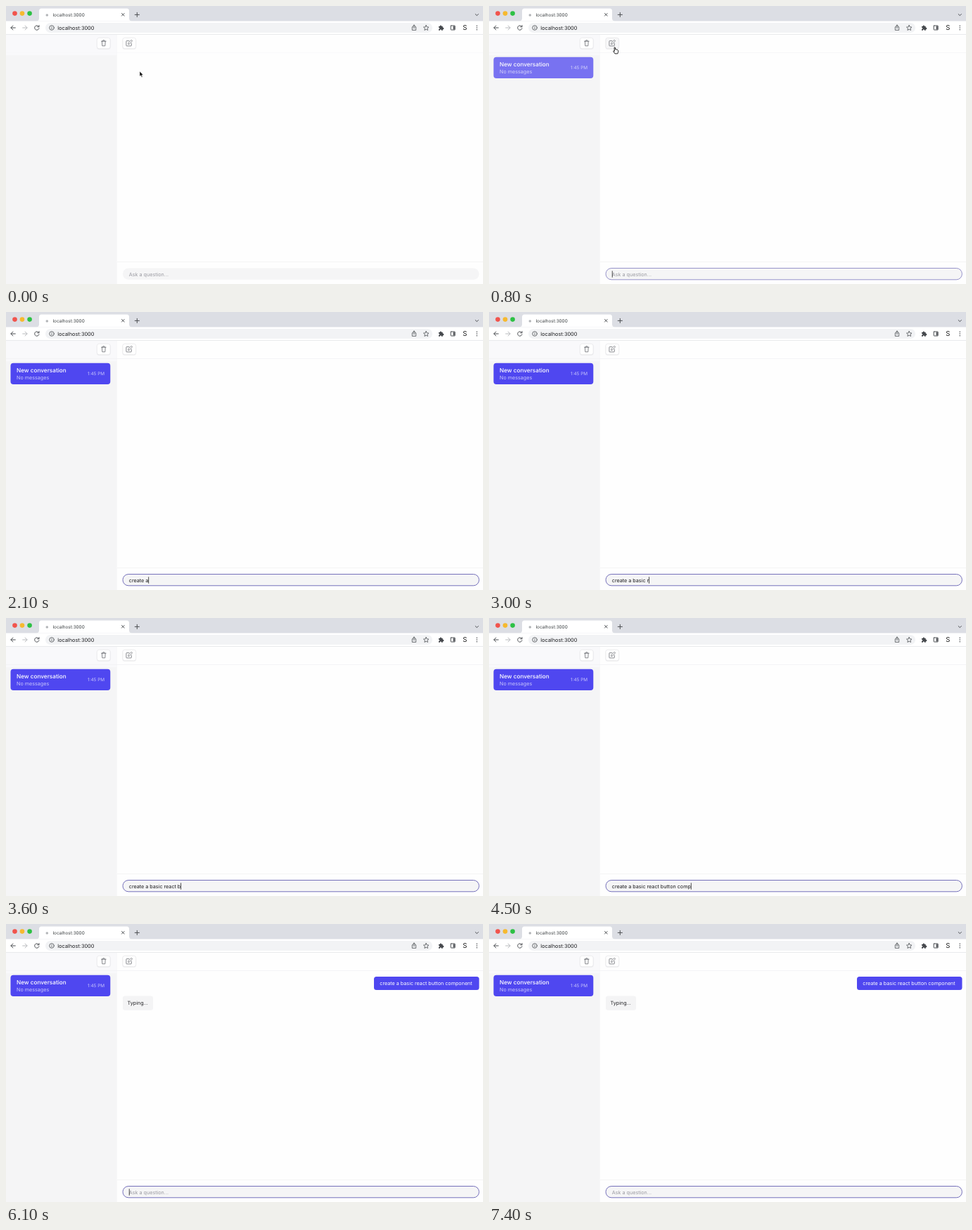
These frames come from a looping animation (678x396 px, 8000 ms). An HTML page:

```html
<!DOCTYPE html>
<html lang="en">
<head>
<meta charset="utf-8">
<title>Chat</title>
<style>
  html, body { margin: 0; width: 100%; height: 100%; overflow: hidden; background: #fefefe; }
  svg { display: block; width: 678px; height: 396px; }
  text { font: 7.2px Inter, "Liberation Sans", sans-serif; white-space: pre; text-rendering: geometricPrecision; }
  .icon { fill: none; stroke: #4b4e52; stroke-width: 1; stroke-linecap: round; stroke-linejoin: round; }
  .thin { stroke-width: .8; }
  .button { fill: #fff; stroke: #e5e5e8; stroke-width: .7; }
</style>
</head>
<body>
<svg viewBox="0 0 678 396">
  <!-- browser window -->
  <rect width="678" height="22" fill="#dcdee4"/>
  <circle cx="12.5" cy="10.6" r="3.3" fill="#f1544d"/>
  <circle cx="23" cy="10.6" r="3.3" fill="#f6b92f"/>
  <circle cx="33.6" cy="10.6" r="3.3" fill="#2dc144"/>
  <path d="M43 21.5q4 0 4-4V7q0-3.5 3.5-3.5H171.5q3.5 0 3.5 3.5V17.5q0 4 4 4z" fill="#fff"/>
  <circle cx="58.3" cy="13" r="1.8" fill="#b3b5b8"/>
  <text x="66.5" y="14.6" fill="#3c4043" style="font-size:6.4px">localhost:3000</text>
  <path class="icon" d="M164.5 10.5l3.6 3.6m0-3.6l-3.6 3.6M183.2 12.4h6.2m-3.1-3.1v6.2M667.2 11.6l2.1 2 2.1-2"/>
  <rect y="21.5" width="678" height="19" fill="#fff"/>
  <rect x="56" y="24" width="550" height="14" rx="7" fill="#f2f3f5"/>
  <text x="73.2" y="33.5" fill="#202124" style="font-size:7.4px">localhost:3000</text>
  <path d="M0 40.5H678" stroke="#e4e5e8" stroke-width=".8"/>
  <g class="icon">
    <path d="M13.3 31H7m2.9-3L6.9 31l3 3"/>
    <path d="M23.7 31H30m-2.9-3l3 3-3 3" stroke="#b9bbbe"/>
    <path d="M46.6 29.3a3.2 3.2 0 1 0 .4 2.6M47 27.6v2.2h-2.2"/>
    <g class="thin">
      <circle cx="65" cy="31" r="3.3"/>
      <path d="M65 30.8v1.7M65 29.3v.1"/>
      <path d="M578.800 29.800h-1.500v4.600h5.400v-4.600h-1.500M580 32v-5m-1.600 1.500L580 27l1.600 1.500"/>
      <path d="M597.200 27.400l1.100 2.400 2.600.3-1.900 1.800.5 2.600-2.300-1.300-2.300 1.300.5-2.600-1.900-1.800 2.600-.3z"/>
    </g>
    <rect x="632.2" y="28" width="6" height="6" rx=".5"/>
    <path d="M636.7 28.5v5" stroke-width="2" stroke-linecap="butt"/>
  </g>
  <path d="M615 29h1.800a1.200 1.200 0 1 1 2.300 0h1.700v1.900a1.200 1.200 0 1 1 0 2.300v1.500h-2a1 1 0 1 0-1.900 0H615v-2a1 1 0 1 0 0-1.900z" fill="#45484c"/>
  <text x="652.3" y="34.4" text-anchor="middle" fill="#222" style="font-size:9.5px">S</text>
  <g fill="#4b4e52"><circle cx="669.3" cy="28.3" r=".8"/><circle cx="669.3" cy="31" r=".8"/><circle cx="669.3" cy="33.7" r=".8"/></g>

  <!-- page -->
  <rect y="41" width="157" height="355" fill="#f5f5f6"/>
  <rect y="41" width="157" height="29" fill="#f9f9fb"/>
  <path d="M157.5 41V396" stroke="#f6f6f8" stroke-width=".8"/>
  <path id="headerLine" d="M0 66.5H678" stroke="#f2f2f4" stroke-width=".8"/>
  <path d="M158 364.5H678" stroke="#f1f1f3" stroke-width=".8"/>
  <g fill="#d9d9dd" opacity=".45">
    <rect x="129" y="45.8" width="19.5" height="16" rx="3"/>
    <rect x="165.5" y="45.8" width="19.5" height="16" rx="3"/>
  </g>
  <rect class="button" x="129.3" y="45.3" width="18.8" height="15.5" rx="3"/>
  <rect id="compose" class="button" x="165.9" y="45.3" width="18.8" height="15.5" rx="3"/>
  <g class="icon thin" style="stroke:#696b70">
    <path d="M135.5 50.2h6.600m-5.700 0l.4 6.600h4l.4-6.600m-3.500 0v-1.400h2.200v1.400"/>
    <path d="M174.800 49.600h-3.200q-.7 0-.7.700v5.900q0 .7.700.7h6q.7 0 .7-.7v-3M173.800 54.200l.3-1.900 4-4 1.500 1.500-4 4z"/>
  </g>

  <g id="card" fill="#c9c7fc">
    <rect x="6.5" y="72.7" width="141.8" height="30.2" rx="4" fill="#4f47f0"/>
    <text x="15" y="85.8" fill="#fff" style="font-size:8.2px;font-weight:500">New conversation</text>
    <text x="15" y="95.9">No messages</text>
    <text x="140" y="90.2" text-anchor="end" style="font-size:6.4px">1:45 PM</text>
  </g>

  <g id="chat">
    <rect x="523" y="75" width="149.5" height="19" rx="3.5" fill="#4f47f0"/>
    <text id="sent" x="531.3" y="87.2" fill="#fff"></text>
    <rect x="166" y="102.5" width="43" height="20.3" rx="3" fill="#f4f4f5"/>
    <text x="172.6" y="115.2" fill="#242427">Typing...</text>
  </g>

  <rect x="166" y="373.5" width="506.4" height="16.3" rx="8.1" fill="#f5f5f6"/>
  <rect id="ring" x="166" y="373.5" width="506.4" height="16.3" rx="8.1" fill="none" stroke="#6660b4" stroke-width=".9"/>
  <text id="hint" x="174.8" y="384.5" fill="#9a9aa1">Ask a question...</text>
  <text id="typed" x="174.8" y="384.5" fill="#18181b"></text>
  <rect id="caret" y="377.3" width=".8" height="9.4" fill="#222"/>

  <path id="arrow" d="M0 0V7.200L1.600 5.700 2.800 8.400 4 7.900 2.900 5.300H5z" fill="#111" stroke="#fff" stroke-width=".5"/>
  <path id="hand" d="M0 .7Q.8-.3 1.400.7L1.800 3.500 2.800 3.300 3.900 3.700 4.900 4 5.600 4.800V7L4.800 9.400H1L-1 6.500Q-1.600 5.300-.6 5.200L.4 6z" fill="#fff" stroke="#222" stroke-linejoin="round"/>
</svg>
<script>
const LOOP = 8000, TICK = 100;
const PROMPT = "create a basic react button component";
const INPUT_X = 174.8, SEND_AT = 5600;

// [time, characters typed]; the text holds between entries
const KEYS = [[1700, 1], [1800, 2], [1900, 4], [2000, 6], [2100, 8], [2200, 9], [2300, 11], [2400, 13],
  [2500, 15], [3000, 16], [3100, 17], [3200, 19], [3300, 20], [3500, 21], [3600, 22], [3700, 23],
  [3800, 24], [3900, 25], [4000, 26], [4100, 27], [4300, 29], [4500, 32], [4600, 33], [4700, 35],
  [4800, 36], [4900, 37]];
const CARET_OFF = [[0, 700], [1400, 1700], [2700, 3000], [5300, 5700], [7400, LOOP]];

const el = Object.fromEntries([...document.querySelectorAll("[id]")].map(node => [node.id, node]));
const clamp = v => Math.max(0, Math.min(1, v));
const mix = (a, b, p) => a + (b - a) * p;
const fade = (node, value) => node.setAttribute("opacity", value);
const place = (node, x, y) => node.setAttribute("transform", `translate(${x} ${y})`);

el.sent.textContent = PROMPT;

function typedLength(t) {
  return KEYS.reduce((count, [at, n]) => t >= at ? n : count, 0);
}

function drawPointer(t) {
  const p = clamp(t / 500), eased = p * p * (3 - 2 * p);
  const x = mix(190, 178, eased), y = mix(93, 58.5, eased);
  const onButton = y < 61, visible = t < 1700;
  place(el.arrow, x, y);
  place(el.hand, x, y);
  fade(el.arrow, visible && !onButton ? 1 : 0);
  fade(el.hand, visible && onButton ? 1 : 0);
  el.compose.style.fill = visible && onButton ? "#f7f7f8" : "#fff";
}

function render(time) {
  const t = Math.floor(time / TICK) * TICK;
  drawPointer(t);

  const opened = t < 700 ? 0 : clamp(.5 + (t - 700) / 400);
  fade(el.card, opened);
  fade(el.ring, opened);
  fade(el.headerLine, .3 + .7 * opened);

  const sent = t < SEND_AT ? 0 : clamp(.5 + (t - SEND_AT) / 200);
  const count = typedLength(t);
  fade(el.chat, sent);
  fade(el.typed, sent ? (1 - sent) * 1.2 : 1);
  fade(el.hint, count ? sent : 1);
  el.typed.textContent = PROMPT.slice(0, count);

  const width = count && !sent ? el.typed.getComputedTextLength() : 0;
  el.caret.setAttribute("x", INPUT_X + width);
  fade(el.caret, CARET_OFF.some(([from, to]) => t >= from && t < to) ? 0 : 1);
}

const start = performance.now();
function loop() {
  render((performance.now() - start) % LOOP);
  requestAnimationFrame(loop);
}
loop();
</script>
</body>
</html>
```
